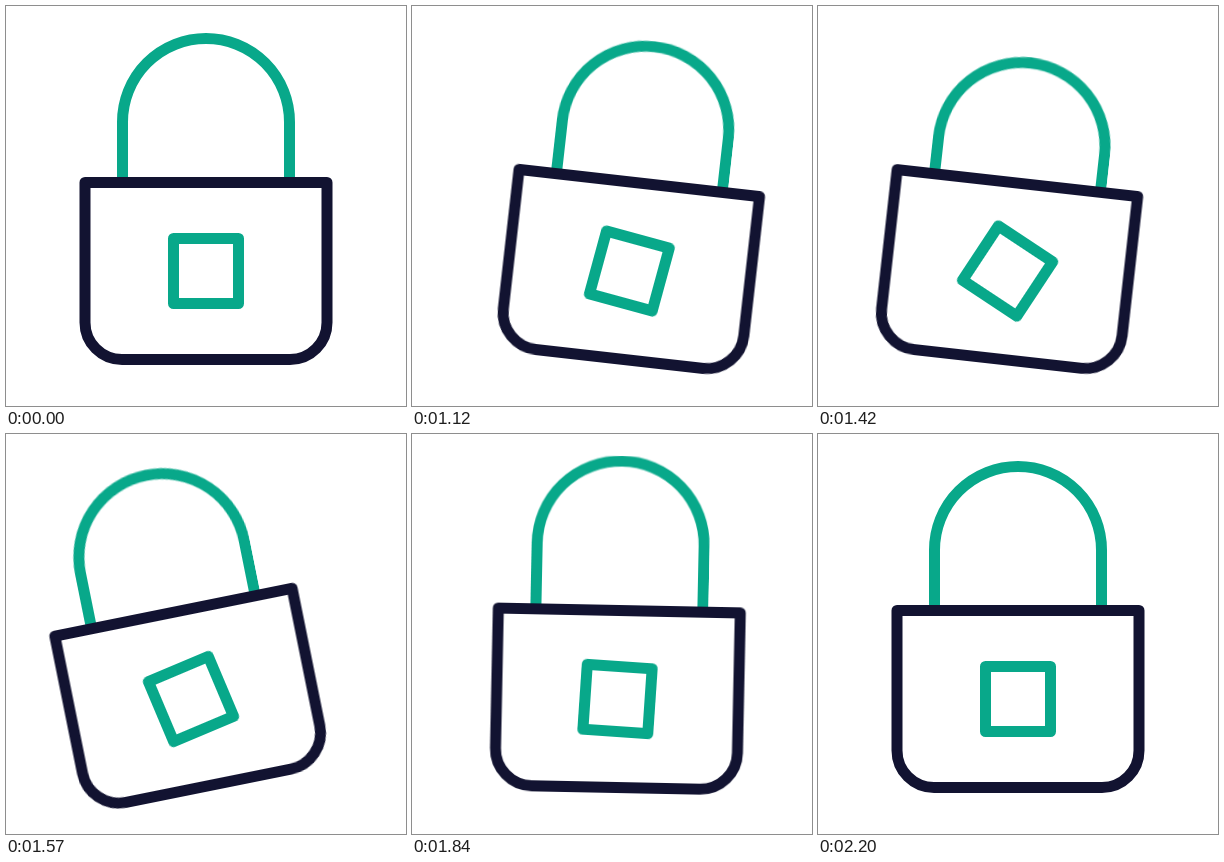
Animation of 400x400 px, one loop 2230 ms. Source, as an HTML page without scripts:

```html
<!DOCTYPE html>
<html lang="en">
<head>
<meta charset="utf-8">
<title>Padlock wobble</title>
<style>
  html, body { margin: 0; width: 100%; height: 100%; overflow: hidden; background: #fff; }
  svg { display: block; width: 100%; height: 100%; }

  .lock { fill: none; stroke: #121331; stroke-width: 11; stroke-linejoin: round; }
  .green { stroke: #08a88a; }

  /* Each part swings out, back and settles, slightly later than the one before. */
  .slide, .tilt, .keyhole, .shackle {
    transform-origin: 200px 265px;
    animation: 2230ms cubic-bezier(.333, 0, .667, 1) infinite;
  }
  .slide { animation-name: slide; }
  .tilt { animation-name: tilt; }
  .keyhole { animation-name: spin; }
  .shackle { animation-name: bob; }

  @keyframes slide {
    0% { transform: translateX(0); }
    44.84% { transform: translateX(0); animation-timing-function: cubic-bezier(.3, .2, .67, 1); }
    54.26% { transform: translateX(25.3px); }
    67.71% { transform: translateX(-20px); }
    77.8% { transform: translateX(7.5px); }
    91.93%, 100% { transform: translateX(0); }
  }
  @keyframes tilt {
    0%, 44.84% { transform: rotate(0deg); }
    57.62% { transform: rotate(16.6deg); }
    73.5% { transform: rotate(-14.4deg); }
    85.2% { transform: rotate(3.5deg); }
    98.65%, 100% { transform: rotate(0deg); }
  }
  @keyframes spin {
    0%, 44.84% { transform: rotate(0deg); }
    59.64% { transform: rotate(50deg); }
    74.44% { transform: rotate(-38.8deg); }
    85.2% { transform: rotate(11.5deg); }
    98.65%, 100% { transform: rotate(0deg); }
  }
  @keyframes bob {
    0%, 44.84% { transform: translateY(0); }
    60.99% { transform: translateY(25.8px); }
    78.48% { transform: translateY(-12.4px); }
    88.57% { transform: translateY(6.9px); }
    98.65%, 100% { transform: translateY(0); }
  }
</style>
</head>
<body>
<svg viewBox="0 0 400 400">
  <clipPath id="above-case"><rect x="0" y="-50" width="400" height="226"/></clipPath>
  <g class="lock slide">
    <g class="tilt">
      <g clip-path="url(#above-case)">
        <path class="green shackle" d="M116.5 220V116a83.5 83.5 0 0 1 167 0V220"/>
      </g>
      <path d="M79 176.5H321V316.5a37 37 0 0 1-37 37H116a37 37 0 0 1-37-37Z"/>
    </g>
    <rect class="green keyhole" x="167.5" y="232.5" width="65" height="65"/>
  </g>
</svg>
</body>
</html>
```
